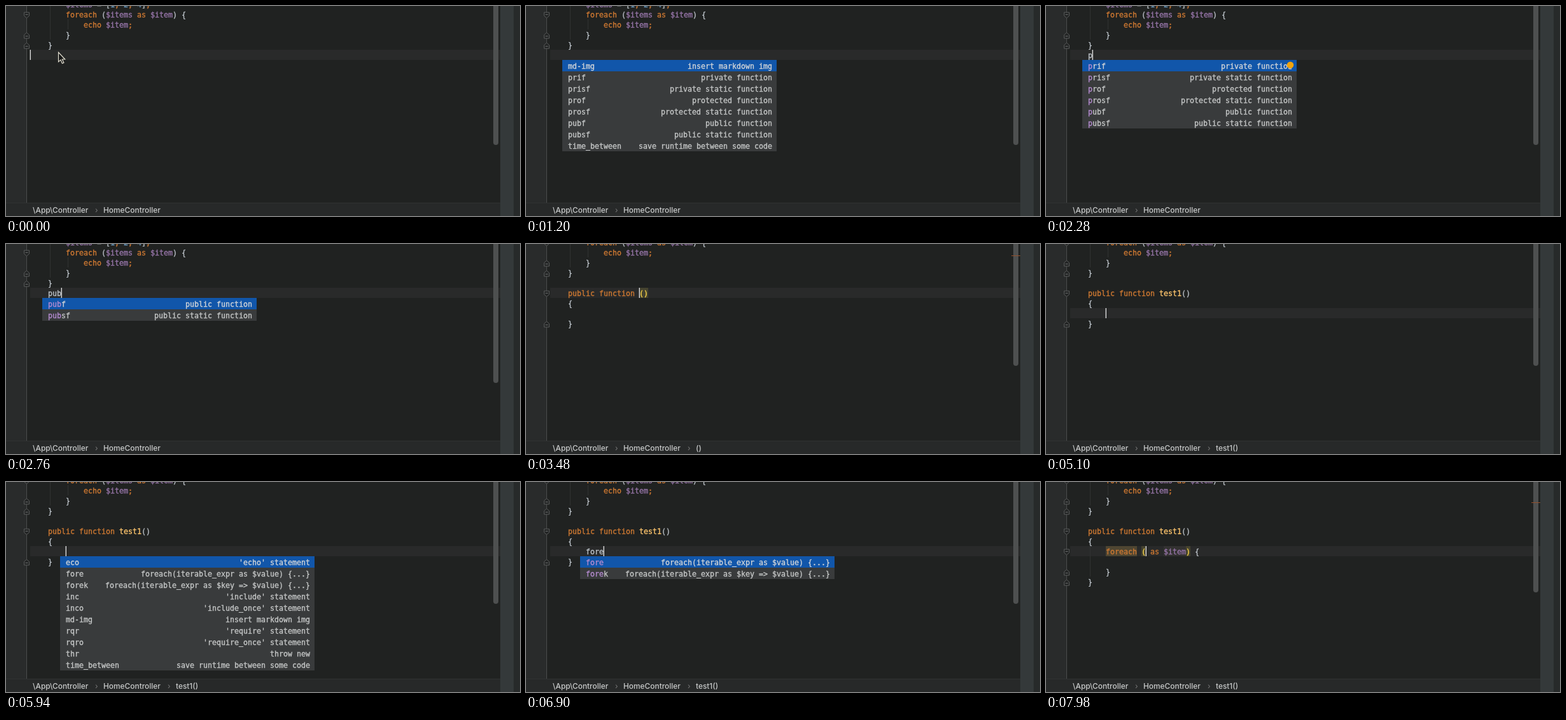
An HTML page for the animation above (8000 ms loop, 808 by 331 pixels).

```html
<!DOCTYPE html>
<html lang="en">
<head>
<meta charset="utf-8">
<title>Live templates</title>
<style>
  html, body { margin: 0; width: 100%; height: 100%; overflow: hidden; background: #202221; }
  #stage { position: relative; width: 808px; height: 331px; overflow: hidden; background: #202221;
    font: 11.63px/18px "DejaVu Sans Mono", monospace; color: #bcc2c8; -webkit-text-stroke: .35px; }
  #stage div, #stage svg { position: absolute; white-space: pre; }
  #gutter { left: 0; top: 0; width: 33px; height: 310px; background: #292b2b; }
  #gutterLine { left: 32px; top: 0; width: 1px; height: 310px; background: #4b4d4d; }
  #caretRow { left: 38px; width: 739px; height: 16px; background: #292a2a; }
  #caret { width: 1px; height: 16px; background: #dcdcdc; box-shadow: -1px 0 #dcdcdc60; }
  #thumb { left: 766px; top: -20px; width: 8px; border-radius: 4px; background: #4e5050; }
  #warning { left: 763px; width: 14px; height: 1px; background: #95502c; }
  #crumbs { left: 0; top: 310px; width: 777px; height: 21px; background: #272929;
    box-shadow: inset 0 1px #303232; font: 500 11.9px/24px Inter, sans-serif; color: #c8caca;
    -webkit-text-stroke: 0; }
  #crumbs .sep { color: #777; font-weight: 400; }
  #side { left: 777px; top: 0; width: 21px; height: 331px; background: #34393a; }
  #edge { left: 798px; top: 0; width: 10px; height: 331px; background: #272a2a; }
  #popup { background: #393b3c; color: #c4c6c6; line-height: 20px; overflow: hidden; }
  #popup div { left: 0; width: 100%; height: 18px; }
  #popup .first { background: #1156aa; color: #d0d4d8; }
  #popup span { position: absolute; left: 9px; }
  #popup span.about { left: auto; right: 7px; }
  #popup b { font-weight: 400; color: #b58bd0; }
  #code div { height: 16px; }
  .guide { width: 1px; background: #303232; }
  .key { color: #cc7832; } .var { color: #9876aa; } .num { color: #6897bb; } .name { color: #ffc66d; }
  .pair { color: #ffd84a; background: #45432f; }
  .usage { color: #cc7832; background: #4f4632; }
  .slot { color: #9876aa; background: #333231; }
</style>
</head>
<body>
<div id="stage">
  <div id="gutter"></div>
  <div id="caretRow"></div>
  <div id="gutterLine"></div>
  <div id="code"></div>
  <div id="caret"></div>
  <div id="thumb"></div>
  <div id="warning"></div>
  <div id="crumbs"></div>
  <div id="side"></div>
  <div id="edge"></div>
  <div id="popup"></div>
  <svg id="bulb" style="left:378px;top:87px" width="12" height="15">
    <circle cx="6" cy="6" r="5.3" fill="#f0a30c"/><path d="M4 11h4v2h-4z" fill="#a9a9a9"/>
  </svg>
  <svg id="pointer" style="left:80px;top:71px" width="16" height="22">
    <path d="M2.5 2v15l3.4-3.1 2.5 5.6 2.5-1.1-2.5-5.4h4.3z" fill="#181818" stroke="#e2dfd0" stroke-width="1.2"/>
  </svg>
</div>
<script>
const LOOP = 8000, CHAR = 7, ROW = 16, LEFT = 38;
const el = id => document.getElementById(id);
const box = (x, y, content, cls = '', style = '') =>
  `<div class="${cls}" style="left:${x}px;top:${y}px;${style}">${content}</div>`;

const memberTemplates = [
  ['md-img', 'insert markdown img'],
  ['prif', 'private function'],
  ['prisf', 'private static function'],
  ['prof', 'protected function'],
  ['prosf', 'protected static function'],
  ['pubf', 'public function'],
  ['pubsf', 'public static function'],
  ['time_between', 'save runtime between some code'],
];
const bodyTemplates = [
  ['eco', "'echo' statement"],
  ['fore', 'foreach(iterable_expr as $value) {...}'],
  ['forek', 'foreach(iterable_expr as $key => $value) {...}'],
  ['inc', "'include' statement"],
  ['inco', "'include_once' statement"],
  ['md-img', 'insert markdown img'],
  ['rqr', "'require' statement"],
  ['rqro', "'require_once' statement"],
  ['thr', 'throw new'],
  ['time_between', 'save runtime between some code'],
];

const head = [
  '        $items = [1, 2, 4];',
  '        foreach ($items as $item) {',
  '            echo $item;',
  '        }',
  '    }',
];
const method = (name, ...body) => [...head, '', `    public function ${name}()`, '    {', ...body, '    }'];
const loopBody = ['        foreach ( as $item) {', '', '        }'];
const memberPopup = prefix => ({ items: memberTemplates, x: 57, y: 85, width: 337, prefix });
const bodyPopup = prefix => ({ items: bodyTemplates, x: 85, y: 117, width: 400, prefix });

// Fold entries: [row, closing]. Guides: [column, first row, row count].
const headFolds = [[1, 0], [3, 1], [4, 1]];
const headGuides = [[4, 0, 4], [8, 2, 1]];
const loopPair = [[16, 8, '(', 'pair'], [26, 8, ')', 'pair']];

const steps = [
  [0, { lines: head, scroll: 0, caret: [0, 5], thumb: 219, crumb: '', warning: 0, folds: headFolds,
        guides: headGuides, marks: [], popup: null, bulb: false, pointer: true }],
  [600, { caret: [4, 5], pointer: false }],
  [1140, { popup: memberPopup('') }],
  ...typed([1860], 'p', ''),
  [2100, { bulb: true }],
  ...typed([2580, 2700, 2820], 'ubf', 'p'),
  [3000, { lines: method('', ''), scroll: 16, caret: [20, 6], thumb: 192, popup: null,
           marks: [[20, 6, '()', 'pair']] }],
  [3240, { crumb: '()' }],
  [3420, { warning: 18, folds: [...headFolds, [6, 0], [9, 1]] }],
  ...[...'test1'].map((_, i) => [3660 + i * 120, {
    lines: method('test1'.slice(0, i + 1), ''), caret: [21 + i, 6], marks: [[21 + i, 6, '()', 'pair']] }]),
  [4500, { warning: 0, crumb: 'test1()' }],
  [4620, { caret: [8, 8], marks: [] }],
  [5940, { popup: bodyPopup('') }],
  ...[6300, 6420, 6600, 6720].map((time, i) => {
    const word = 'fore'.slice(0, i + 1);
    return [time, { lines: method('test1', '        ' + word), caret: [9 + i, 8], popup: bodyPopup(word) }];
  }),
  [7500, { lines: method('test1', ...loopBody), caret: [17, 8], popup: null, thumb: 174, marks: loopPair,
           folds: [...headFolds, [6, 0], [11, 1]], guides: [...headGuides, [4, 8, 3]] }],
  [7740, { warning: 32, folds: [...headFolds, [6, 0], [8, 0], [10, 1], [11, 1]],
           marks: [...loopPair, [8, 8, 'foreach', 'usage'], [21, 8, '$item', 'slot']] }],
];

function typed(times, letters, before) {
  return times.map((time, i) => {
    const word = before + letters.slice(0, i + 1);
    return [time, { lines: [...head, '    ' + word], caret: [4 + word.length, 5],
                    popup: memberPopup(word), bulb: false }];
  });
}

function highlight(line) {
  const rule = /((?<=function )\w+)|(\b(?:foreach|as|echo|public|function)\b|[;,])|(\$\w+)|(\b\d+\b)/g;
  return line.replace(rule, (text, name, key, variable) =>
    `<span class="${name ? 'name' : key ? 'key' : variable ? 'var' : 'num'}">${text}</span>`);
}

function foldIcon(y, closing) {
  const flip = closing ? 'transform:scaleY(-1);' : '';
  return `<svg style="left:28px;top:${y}px;${flip}" width="9" height="11">
    <path d="M.5 1h8v5.5l-4 3.5-4-3.5z" fill="#232525" stroke="#585a5a"/>
    <path d="M2.5 4.5h4" stroke="#6c6e6e"/></svg>`;
}

function popupRows({ items, prefix }) {
  return items.filter(([name]) => name.startsWith(prefix)).map(([name, about], i) =>
    box(0, i * 18, `<span><b>${prefix}</b>${name.slice(prefix.length)}</span><span class="about">${about}</span>`,
      i ? '' : 'first'));
}

function draw(s) {
  const rowTop = row => row * ROW - 11 - s.scroll;
  const colLeft = col => LEFT + col * CHAR;
  el('code').innerHTML = [
    ...s.guides.map(([c, r, n]) => box(colLeft(c) + 3, rowTop(r), '', 'guide', `height:${n * ROW}px`)),
    ...s.lines.map((line, r) => box(LEFT, rowTop(r), highlight(line))),
    ...s.marks.map(([c, r, text, cls]) => box(colLeft(c), rowTop(r), text, cls)),
    ...s.folds.map(([r, closing]) => foldIcon(rowTop(r) + 4, closing)),
  ].join('');

  const [col, row] = s.caret;
  el('caretRow').style.top = el('caret').style.top = rowTop(row) + 'px';
  el('caret').style.left = colLeft(col) + 'px';
  el('thumb').style.height = s.thumb + 20 + 'px';
  el('warning').style.top = s.warning + 'px';

  const names = [[42, '\\App\\Controller'], [153, 'HomeController'], [267, s.crumb]];
  el('crumbs').innerHTML = names.map(([x, name], i) => name &&
    (i ? box(x - 13, 0, '›', 'sep') : '') + box(x, 0, name)).join('');

  const show = (id, on) => { el(id).style.display = on ? 'block' : 'none'; };
  show('warning', s.warning);
  show('bulb', s.bulb);
  show('pointer', s.pointer);
  show('popup', s.popup);
  if (s.popup) {
    const rows = popupRows(s.popup), { x, y, width } = s.popup;
    el('popup').innerHTML = rows.join('');
    el('popup').style.cssText += `;left:${x}px;top:${y}px;width:${width}px;height:${rows.length * 18}px`;
  }
}

let shown = -1;
const start = performance.now();

function tick() {
  const t = Math.max(0, performance.now() - start) % LOOP;
  const past = steps.filter(([time]) => time <= t);
  if (past.length !== shown) {
    shown = past.length;
    draw(Object.assign({}, ...past.map(([, change]) => change)));
  }
  // The blink restarts whenever the caret moves.
  const moved = past.filter(([, change]) => change.caret).pop()[0];
  el('caret').style.visibility = (t - moved) % 1000 < 500 ? 'visible' : 'hidden';
  requestAnimationFrame(tick);
}
tick();
</script>
</body>
</html>
```
